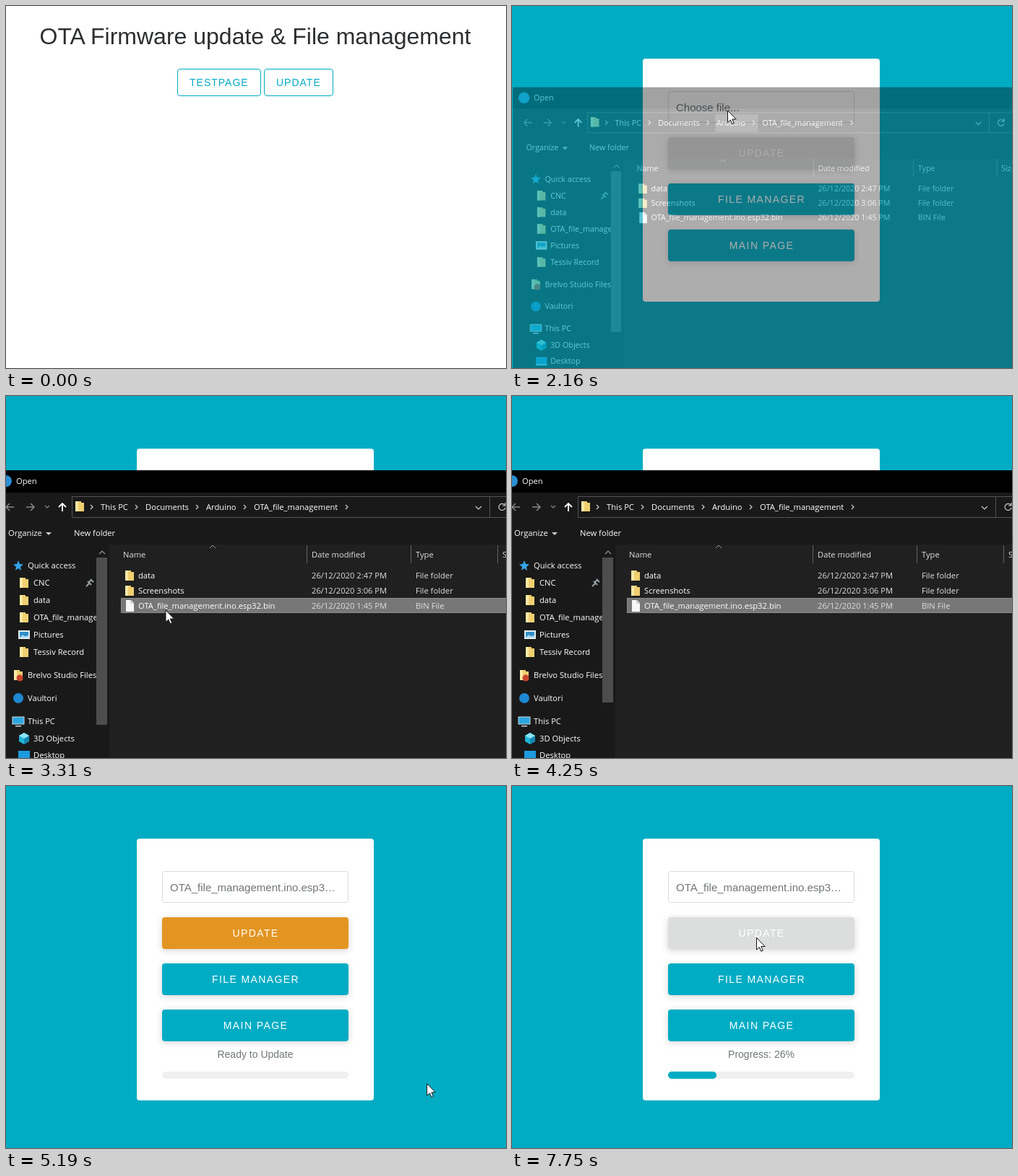
These frames come from a looping animation (692x502 px, 8000 ms). An HTML page:

```html
<!DOCTYPE html>
<html lang="en">
<head>
<meta charset="utf-8">
<title>OTA update</title>
<style>
  html, body { margin: 0; width: 100%; height: 100%; overflow: hidden; background: #fff; }
  svg { display: block; }
  text { font: 14px "Liberation Sans", Arial, sans-serif; white-space: pre; }
  .title { font-size: 32px; fill: #2c2e31; }
  .outline { letter-spacing: 1px; }
  .label { letter-spacing: 1.4px; fill: #fff; }
  .field { font-size: 15px; fill: #70757a; }
  .status { fill: #70777b; }
  .raised { filter: drop-shadow(0 2px 5px rgba(0, 0, 0, .17)); }
  .lifted { filter: drop-shadow(0 3px 2.5px rgba(0, 0, 0, .4)); }
  #dialog text { font: 11.2px "Open Sans", "Noto Sans", sans-serif; fill: #fff; }
  #dialog .dim { fill: #dedede; }
</style>
</head>
<body>
<svg id="stage" width="692" height="502" viewBox="0 0 692 502"></svg>
<script>
const TEAL = '#00acc4', DURATION = 8000;

const ticks = [0, 70, 150, 220, 290, 370, 440, 770, 910, 980, 1210, 1290, 1380, 1460, 1610,
  1780, 1860, 2010, 2160, 2240, 2320, 2400, 2480, 2550, 2630, 2710, 2780, 2860, 3160, 3310,
  3770, 3850, 3930, 4250, 4570, 4650, 4720, 4800, 5110, 5190, 5270, 5340, 5420, 5950, 6030,
  6180, 6350, 6600, 6830, 6980, 7360, 7530, 7750];

// Pointer hotspot: time, x, y
const pointerKeys = [
  [0, 720, 540], [70, 655, 478], [440, 384, 106], [1130, 384, 106], [1460, 300, 150],
  [1610, 298.5, 145], [2400, 298.5, 145], [2860, 221, 297], [3690, 221, 297],
  [3850, 617, 473], [3930, 720, 540], [5030, 720, 540], [5110, 631, 453],
  [5420, 338.5, 210.5], [8000, 338.5, 210.5]];

const rect = (x, y, w, h, fill, extra = '') =>
  `<rect x="${x}" y="${y}" width="${w}" height="${h}" fill="${fill}" ${extra}/>`;
const text = (x, y, str, extra = '') => `<text x="${x}" y="${y}" ${extra}>${str}</text>`;
const line = (d, color = '#ccc', width = 1.2) =>
  `<path d="${d}" fill="none" stroke="${color}" stroke-width="${width}"/>`;
const dot = (x, y, r, fill) => `<circle cx="${x}" cy="${y}" r="${r}" fill="${fill}"/>`;
const centred = 'text-anchor="middle"';

function homePage() {
  const button = (id, x, w, label) => `<g id="${id}">` +
    rect(x + .5, 87.5, w - 1, 37, '#fff', `rx="3.5" stroke="${TEAL}"`) +
    text(x + 17, 111, label, `class="outline" fill="${TEAL}"`) + '</g>';
  return text(345, 53, 'OTA Firmware update &amp; File management', `class="title" ${centred}`) +
    button('test', 237, 116, 'TESTPAGE') + button('open', 357, 96, 'UPDATE');
}

function uploadPage() {
  const button = (id, y, label) =>
    rect(216, y, 258, 44, TEAL, `id="${id}" class="raised" rx="4"`) +
    text(345.5, y + 27, label, `class="label" ${centred}`);
  return rect(0, 0, 692, 502, TEAL) + rect(181, 73, 328, 337, '#fff', 'id="card" rx="4"') +
    rect(216.5, 118.5, 257, 43, '#fff', 'rx="3" stroke="#d9dcdd"') +
    text(227, 146, '', 'id="file" class="field"') +
    button('update', 182, 'UPDATE') + button('manager', 246, 'FILE MANAGER') +
    button('main', 310, 'MAIN PAGE') +
    '<g id="progress">' + text(345, 377, '', `id="status" class="status" ${centred}`) +
    rect(216, 396, 258, 10, '#f0f0f0', 'rx="5"') +
    rect(216, 396, 0, 10, TEAL, 'id="bar" rx="5"') + '</g>';
}

function fileDialog() {
  const label = (x, y, str, extra) => text(x, y + 4, str, extra);
  const folder = (x, y) =>
    `<path d="M${x - 6} ${y - 7}h8v2h4v12h-12z" fill="#f0cf70"/>` +
    `<path d="M${x - 6} ${y - 7}h4v14h-4z" fill="#fbe9a6"/>`;
  const picture = (x, y) => rect(x - 8, y - 6, 16, 12, '#e4eef3') +
    rect(x - 6, y - 4, 12, 8, '#2f8fca') + `<path d="M${x - 6} ${y + 4}l4-4 3 2 5-1v3z" fill="#a4d8ee"/>`;
  const monitor = (x, y) => rect(x - 8, y - 6, 16, 10, '#2aa7df', 'stroke="#cdd8de"') +
    rect(x - 4, y + 6, 8, 1.5, '#cdd8de');
  const cube = (x, y) => `<path d="M${x} ${y - 8}l7 4v8l-7 4-7-4v-8z" fill="#20b4d8"/>` +
    `<path d="M${x} ${y}l7-4v8l-7 4z" fill="#1689b4"/><path d="M${x} ${y - 8}l7 4-7 4-7-4z" fill="#8be4f5"/>`;
  const desktop = (x, y) => rect(x - 8, y - 6, 16, 12, '#1c9be0') + rect(x - 8, y + 4, 16, 2, '#9bd3f2');
  const crumbMark = x => line(`M${x - 2} 151l3 3-3 3`);

  const frame = rect(-16, 103, 898, 510, '#191919') + rect(-16, 103, 898, 31, '#000') +
    '<g id="appIcon">' + dot(0, 118, 8, '#2a8fd2') + '</g>' + label(14, 118, 'Open', 'id="caption"');

  const navigation = line('M11 154H0M5 149l-5 5 5 5', '#888', 1.5) +
    line('M28 154h11M34 149l5 5-5 5', '#888', 1.5) + line('M54 152l3 3 3-3', '#888') +
    line('M78 160v-11M73 154l5-5 5 5', '#fff', 1.8) +
    rect(91.5, 139.5, 700, 29, '#191919', 'stroke="#535353"') +
    rect(275, 142, 62, 25, '#454545', 'id="crumbHover"') + folder(102, 153) +
    [119, 181, 265, 331, 472].map(crumbMark).join('') +
    [[131, 'This PC'], [193, 'Documents'], [277, 'Arduino'], [343, 'OTA_file_management']]
      .map(([x, str]) => label(x, 154, str)).join('') +
    line('M650 153l4 4 4-4') + line('M669.5 140v29', '#535353', 1) +
    line('M690 151a4.5 4.5 0 1 0 1 4M691 148v4h-4') +
    label(3, 190, 'Organize') + '<path d="M55 189h8l-4 4z" fill="#ccc"/>' + label(94, 190, 'New folder');

  const sidebar = [
    [235, 'Quick access', 0, (x, y) =>
      `<path d="M${x} ${y - 7}l2 5 5 .5-4 3.5 1 5-4-3-4 3 1-5-4-3.5 5-.5z" fill="#35a4e8"/>`],
    [259, 'CNC', 1, folder], [283, 'data', 1, folder], [307, 'OTA_file_management', 1, folder],
    [331, 'Pictures', 1, picture], [355, 'Tessiv Record', 1, folder],
    [387, 'Brelvo Studio Files', 0, (x, y) => folder(x, y) + dot(x + 2, y + 4, 4.5, '#c8442c')],
    [419, 'Vaultori', 0, (x, y) => dot(x, y, 7, '#1e88d2')],
    [451, 'This PC', 0, monitor], [475, '3D Objects', 1, cube], [498, 'Desktop', 1, desktop]
  ].map(([y, name, depth, icon]) => icon(depth ? 25 : 17, y) + label(depth ? 38 : 30, y, name)).join('') +
    line('M111 264l4-4M113 257l5 5M115 258l3-3M117 254l4 4', '#9aa5aa', 1.8) +
    rect(125, 206, 18, 400, '#191919') + line('M129 219l4-4 4 4', '#999') +
    rect(125, 224, 15, 232, '#4d4d4d', 'id="thumb"');

  const row = (y, name, date, type, icon) => icon(171, y) + label(183, y, name) +
    label(423, y, date, 'class="dim"') + label(567, y, type, 'class="dim"');
  const page = (x, y) => `<path d="M${x - 5} ${y - 8}h7l4 4v12h-11z" fill="#f7f7f7"/>` +
    line(`M${x + 2} ${y - 8}v4h4`, '#aaa', 1);
  const list = rect(143, 206, 739, 407, '#202020') + line('M282 211l4-4 4 4', '#999', 1) +
    [416, 560, 680].map(x => line(`M${x + .5} 207v25`, '#636363', 1)).join('') +
    [[162, 'Name'], [423, 'Date modified'], [567, 'Type'], [687, 'Size']]
      .map(([x, str]) => label(x, 220, str, 'class="dim"')).join('') +
    rect(159.5, 280.5, 700, 20, '#777', 'id="row"') +
    row(249, 'data', '26/12/2020 2:47 PM', 'File folder', folder) +
    row(270, 'Screenshots', '26/12/2020 3:06 PM', 'File folder', folder) +
    row(291, 'OTA_file_management.ino.esp32.bin', '26/12/2020 1:45 PM', 'BIN File', page);

  return frame + navigation + sidebar + list;
}

const pointer = dot(0, 0, 12.3, '#f0d800').replace('<circle', '<circle id="click" opacity=".8"') +
  '<g id="busy"><circle cx="14" cy="-.5" r="6.5" fill="none" stroke="#2f7fc0" stroke-width="3"/>' +
  '<path id="spin" d="M14 -7a6.5 6.5 0 0 1 6.5 6.5" fill="none" stroke="#a5dcfa" stroke-width="3"/></g>' +
  '<g fill="#fff" stroke="#111" stroke-linejoin="round">' +
  '<path id="arrow" d="M0 0V16.5L3.8 13 6.3 18.7 8.8 17.6 6.3 12H11.7Z"/>' +
  '<g id="hand"><path d="M-1.7 12V1a1.9 1.9 0 0 1 3.8 0v7c1-1 3-.8 3.4.8 1.2-.8 3-.3 3.2 1.1 1.4-.6 2.8.2 2.8 1.8' +
  'V16c0 4-2 6.5-6 6.5H3C0 22.5-1.5 20.5-2.5 18L-5.3 13.2C-6.3 11.3-4 10.3-2.9 11.4Z"/>' +
  '<path d="M2.1 8v4M5.5 9v3.5M8.7 10v3" fill="none"/></g></g>';

const stage = document.getElementById('stage');
stage.innerHTML = `<g id="home">${homePage()}</g><g id="upload">${uploadPage()}</g>` +
  `<g id="dialog">${fileDialog()}</g><g id="pointer">${pointer}</g>`;

const el = {};
stage.querySelectorAll('[id]').forEach(node => el[node.id] = node);
const show = (id, on) => el[id].style.display = on ? '' : 'none';
const set = (id, name, value) => el[id].setAttribute(name, value);

function pointerAt(t) {
  const i = Math.max(1, pointerKeys.findIndex(key => key[0] >= t));
  const [t0, x0, y0] = pointerKeys[i - 1], [t1, x1, y1] = pointerKeys[i];
  const p = (t - t0) / (t1 - t0), s = p * p * (3 - 2 * p);
  return [x0 + (x1 - x0) * s, y0 + (y1 - y0) * s];
}

function dialogOpacity(t) {
  if (t < 2160 || t >= 4800) return 0;
  if (t < 2400) return 1 - ((2400 - t) / 300) ** 2;
  return t < 4570 ? 1 : 1 - (t - 4545) / 225;
}

function draw(time) {
  const t = ticks.findLast(tick => tick <= time);
  const within = (a, b) => t >= a && t < b;

  show('home', t < 980);
  show('upload', t >= 980);
  const hovered = t >= 440;
  el.open.firstChild.setAttribute('fill', hovered ? TEAL : '#fff');
  el.open.lastChild.setAttribute('fill', hovered ? '#fff' : TEAL);

  const chosen = t >= 4570;
  set('card', 'height', chosen ? 363 : 337);
  el.file.textContent = chosen ? 'OTA_file_management.ino.esp3…' : 'Choose file...';
  const hot = within(5420, 6030);
  set('update', 'fill', !chosen || t >= 6030 ? '#dcdddd' : hot ? '#d48a1d' : '#e39522');
  set('update', 'class', hot ? 'lifted' : 'raised');
  show('progress', chosen);
  const percent = t < 6180 ? 0 : 10 + 2 * ticks.filter(k => k >= 6180 && k <= t).length;
  el.status.textContent = percent ? `Progress: ${percent}%` : 'Ready to Update';
  set('bar', 'width', 258 * percent / 100);

  const opacity = dialogOpacity(t), closing = t >= 4570;
  const scale = 1 - (closing ? .047 : .06) * (1 - opacity);
  show('dialog', opacity > 0);
  set('dialog', 'opacity', opacity);
  set('dialog', 'transform', `translate(433 358) scale(${scale}) translate(-433 -358)`);
  show('appIcon', !closing);
  set('caption', 'x', closing ? -8 : 14);
  show('crumbHover', t < 2480);
  show('row', t >= 2780);
  set('row', 'fill', t < 3160 ? '#4d4d4d' : '#777');
  set('row', 'stroke', t < 3160 ? 'none' : '#8c8c8c');
  set('thumb', 'height', t < 4250 ? 232 : 201);

  set('pointer', 'transform', `translate(${pointerAt(t)})`);
  const hand = within(440, 1860) || within(5340, 6030);
  show('hand', hand);
  show('arrow', !hand);
  show('busy', within(1860, 2160));
  set('spin', 'transform', `rotate(${t < 2010 ? 0 : 150} 14 -.5)`);
  show('click', within(770, 910) || within(1780, 1860) || within(3160, 3310) || within(5950, 6030));
}

const start = performance.now();
function loop() {
  draw((performance.now() - start) % DURATION);
  requestAnimationFrame(loop);
}
loop();
</script>
</body>
</html>
```
